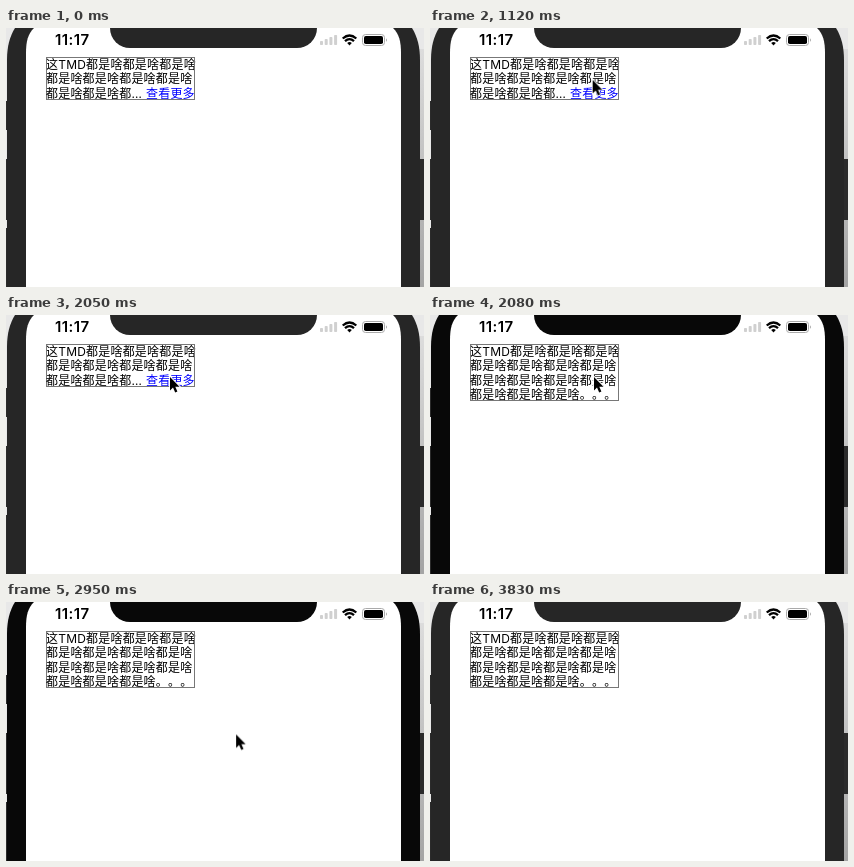
Recreate the animation shown at these times as an HTML page. Size 418 by 259 pixels, loop 3930 ms.

```html
<!DOCTYPE html>
<html lang="zh-CN">
<head>
<meta charset="utf-8">
<title>展开文本</title>
<style>
  html, body { margin: 0; width: 100%; height: 100%; overflow: hidden; background: #e8e8e8; }
  svg { display: block; width: 418px; height: 259px; }
  text { white-space: pre; }

  .clock { font: 600 15px Inter, sans-serif; letter-spacing: .4px; }
  .label {
    font: 12px Inter, "Noto Sans CJK SC", "Noto Sans CJK", sans-serif;
    letter-spacing: .2px;
    text-spacing-trim: space-all;
    font-feature-settings: "chws" 0, "halt" 0, "palt" 0;
  }
  .frame { fill: none; stroke: #777; }

  .body, .collapsed, .expanded, .cursor { animation: 3930ms step-end infinite; }
  .body { fill: #262626; animation-name: focus; }
  .collapsed { animation-name: collapse; }
  .expanded { animation-name: expand; }
  .cursor { animation-name: appear, move; animation-timing-function: step-end, linear; }

  @keyframes focus {
    0%, 97.455% { fill: #262626; }
    52.926% { fill: #080808; }
  }
  @keyframes collapse {
    0% { visibility: visible; }
    52.926%, 100% { visibility: hidden; }
  }
  @keyframes expand {
    0% { visibility: hidden; }
    52.926%, 100% { visibility: visible; }
  }
  @keyframes appear {
    0%, 81.17%, 100% { visibility: hidden; }
    24.427% { visibility: visible; }
  }
  @keyframes move {
    0%, 25.19% { transform: translate(190.5px, 254px); animation-timing-function: cubic-bezier(.25, .5, .5, 1); }
    29.262%, 35.115% { transform: translate(162px, 47px); }
    37.15%, 38.677% { transform: translate(164.5px, 57.5px); animation-timing-function: ease-out; }
    41.73%, 70.47% { transform: translate(164px, 62px); }
    70.483%, 71.247% { transform: translate(170px, 69px); animation-timing-function: cubic-bezier(.4, .25, .75, .8); }
    81.17%, 100% { transform: translate(351px, 260px); }
  }
</style>
</head>
<body>
<svg viewBox="0 0 418 259">
  <defs>
    <linearGradient id="shade" x2="0" y2="1">
      <stop offset="0" stop-color="#dcdcdc"/>
      <stop offset="1" stop-color="#a4a4a4"/>
    </linearGradient>
  </defs>
  <rect width="418" height="259" fill="#e8e8e8"/>
  <rect x="406" y="21" width="12" height="238" fill="url(#shade)"/>

  <!-- side buttons -->
  <g fill="#2b2b2b">
    <rect y="73" width="3" height="29"/>
    <rect y="131" width="3" height="61"/>
    <rect y="200" width="3" height="59"/>
    <rect x="413" y="131" width="5" height="61"/>
  </g>

  <!-- phone -->
  <path class="body" d="M1 259V32C1 18 4 8 9 0H406C411 8 414 18 414 32V259Z"/>
  <path fill="#fff" d="M20 259V25C20 13 22 6 28 0H387C393 6 395 13 395 25V259Z"/>
  <path class="body" d="M104 0A20 20 0 0 0 124 20H291A20 20 0 0 0 311 0Z"/>

  <!-- status bar -->
  <text class="clock" x="49" y="17">11:17</text>
  <g fill="#d0d0d0">
    <rect x="314" y="13" width="3" height="4" rx=".8"/>
    <rect x="318.7" y="11" width="3" height="6" rx=".8"/>
    <rect x="323.4" y="9" width="3" height="8" rx=".8"/>
    <rect x="328.1" y="7" width="3" height="10" rx=".8"/>
  </g>
  <g fill="none" stroke="#000" stroke-width="2.3">
    <path d="M336.7 10.5Q343.5 4.500 350.3 10.5"/>
    <path d="M339 13.2Q343.500 9 348 13.2"/>
  </g>
  <path d="M341.200 15Q343.500 13 345.800 15L343.500 17.500Z"/>
  <rect x="356.5" y="6.5" width="22" height="11" rx="3" fill="none" stroke="#aaa"/>
  <rect x="358" y="8" width="19" height="8" rx="1.800"/>
  <path d="M380 10.200Q382 12 380 13.800Z" fill="#aaa"/>

  <!-- label -->
  <g class="label">
    <text x="40" y="41">这TMD都是啥都是啥都是啥</text>
    <text x="40" y="55.3">都是啥都是啥都是啥都是啥</text>
    <g class="collapsed">
      <rect class="frame" x="40.5" y="29.5" width="148" height="42"/>
      <text x="40" y="69.6">都是啥都是啥都…</text>
      <text x="140" y="69.6" fill="#00f">查看更多</text>
    </g>
    <g class="expanded">
      <rect class="frame" x="40.5" y="29.5" width="148" height="56"/>
      <text x="40" y="69.6">都是啥都是啥都是啥都是啥</text>
      <text x="40" y="83.9">都是啥都是啥都是啥。。。</text>
    </g>
  </g>

  <path class="cursor" d="M0 0V13.500L3 10.600L5.200 15.500L7.400 14.500L5.300 9.700H9.500Z"
        stroke="#fff" stroke-width="1.800" paint-order="stroke"/>
</svg>
</body>
</html>
```
